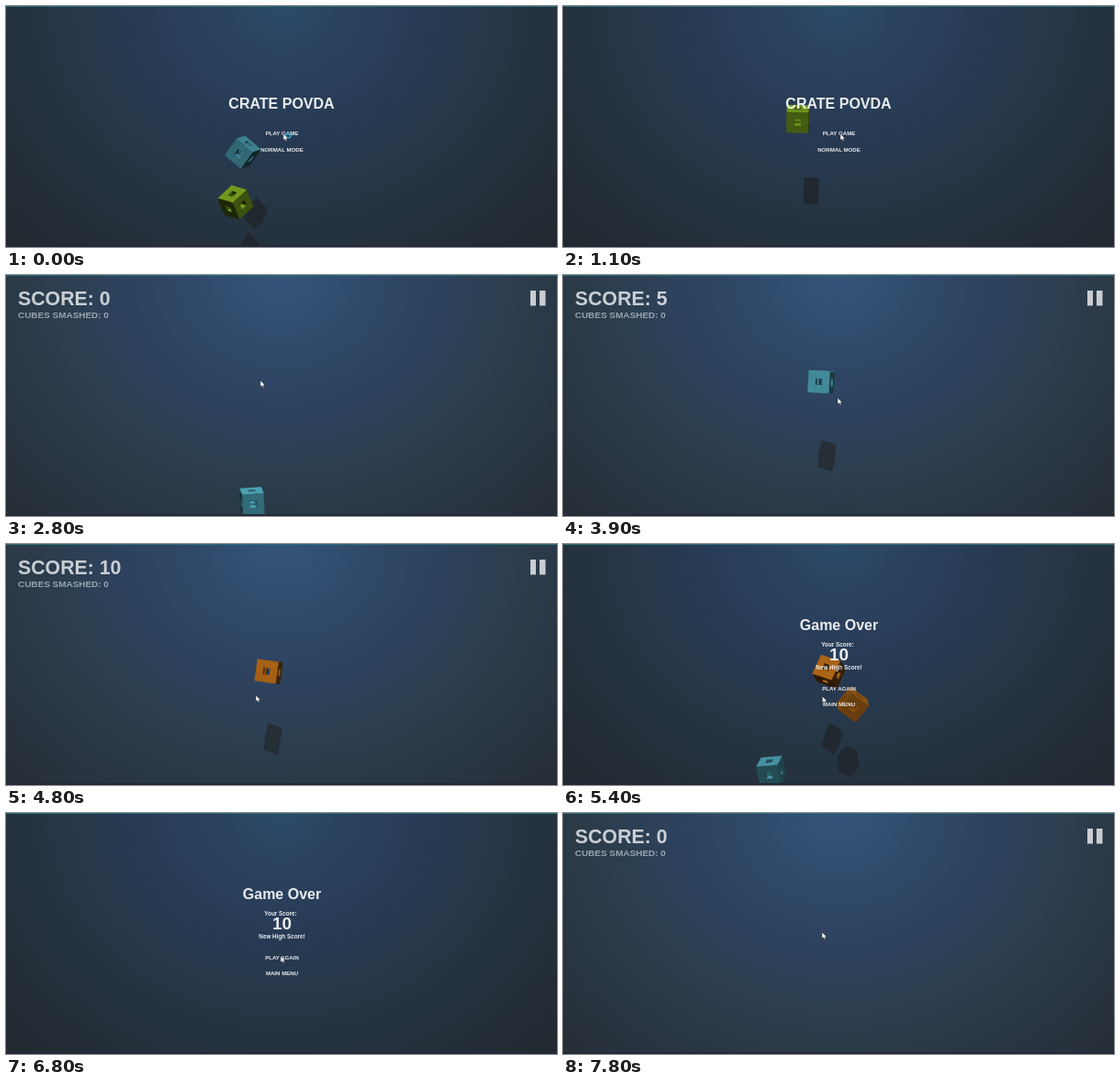
Write an HTML page with a canvas that moves like this. It is 600 by 263 pixels and loops after 8 s.

```html
<!DOCTYPE html>
<html lang="en">
<head>
<meta charset="utf-8">
<title>Cube game</title>
<style>
  html, body { margin: 0; width: 100%; height: 100%; overflow: hidden; }
  body {
    background: radial-gradient(ellipse at top, #335579 0%, #30496a 22%, #2d425e 40%,
      #2c3f51 56%, #2a3a48 68%, #28323d 89%, #262e36 100%);
  }
  canvas, svg { position: absolute; left: 0; top: 0; width: 600px; height: 263px; }
  text { font-family: "Liberation Sans", Arial, sans-serif; font-weight: bold; fill: #fff; }
  .menu { text-anchor: middle; font-size: 6.1px; fill-opacity: .9; }
  .menu .title { font-size: 16px; }
  .menu .note { font-size: 6.35px; }
  .menu .total { font-size: 19px; }
</style>
</head>
<body>
<canvas id="view" width="600" height="263"></canvas>
<svg viewBox="0 0 600 263">
  <rect id="dim" width="600" height="263" fill="#000"/>
  <rect width="600" height="1" fill="#2a6c76"/>
  <rect y="261" width="600" height="2" fill="#23293a"/>
  <g id="hud">
    <text id="score" x="13" y="33.3" font-size="21.3" fill-opacity=".75"></text>
    <text x="13" y="47" font-size="9.95" fill-opacity=".53">CUBES SMASHED: 0</text>
    <path d="M571 17h6v16.500h-6zM581 17h6.500v16.500h-6.500z" fill="#fff" fill-opacity=".75"/>
  </g>
  <g id="start" class="menu">
    <text class="title" x="300" y="111.700">CRATE POVDA</text>
    <text x="300.500" y="141.200">PLAY GAME</text>
    <text x="300.500" y="158.800">NORMAL MODE</text>
  </g>
  <g id="over" class="menu">
    <text class="title" x="300.500" y="93.500">Game Over</text>
    <text class="note" x="299" y="111.700">Your Score:</text>
    <text class="total" x="300.500" y="126.800">10</text>
    <text class="note" x="300.500" y="137.300">New High Score!</text>
    <text x="300.500" y="159.700">PLAY AGAIN</text>
    <text x="300.500" y="177.200">MAIN MENU</text>
  </g>
  <g id="cursor">
    <circle id="busy" cx="5.500" cy="2" r="2.400" fill="none" stroke="#3fa9c4" stroke-width="1.500"/>
    <path d="M0 0V7L1.700 5.600 2.900 8 4.100 7.400 3 5.200H5.200Z" fill="#fff" stroke="#1c2530" stroke-width=".5"/>
  </g>
</svg>
<script>
const $ = id => document.getElementById(id);
const ctx = $('view').getContext('2d');
const SIDE = 23.5, GRAVITY = 169;
const BLUE = [103, 215, 240], GREEN = [166, 224, 44], ORANGE = [254, 149, 34];

// Life span, apex (time, y), then x, speed, pose and spin at time t0 (seconds)
const cubes = [
  { color: BLUE, from: 0, to: 1.4, apex: [.1, 158], t0: 0, x: 258, vx: 80, pose: [.25, -.35, -.95], spin: [.8, .6, -.5] },
  { color: GREEN, from: 0, to: 1.4, apex: [.795, 107.5], t0: 0, x: 250, vx: 5, pose: [-.865, -.775, .286], spin: [.47, .7, -.24] },
  { color: BLUE, from: 2.4, to: 4.9, apex: [3.7, 110], t0: 2.8, x: 268, vx: 12, pose: [-.3, .1, -.07], spin: [.27, -.3, .11] },
  { color: ORANGE, from: 4.1, to: 6.1, apex: [5.1, 124], t0: 4.8, x: 286, vx: 6, pose: [0, -.2, .14], spin: [.5, -.3, .3] },
  { color: BLUE, from: 5.1, to: 6.9, apex: [6, 187], t0: 6.1, x: 221, vx: -8, pose: [0, 0, -.43], spin: [.6, .4, -.5] },
  { color: ORANGE, from: 5, to: 6.9, apex: [5.83, 144], t0: 6.1, x: 368, vx: 75, pose: [-.7, 0, -.54], spin: [-.6, .3, .5] }
];

// Time, x, y
const path = [
  [0, 302, 139.5], [1.8, 302, 139.5], [2.2, 277, 115], [2.9, 277, 115], [3.2, 287, 118], [3.5, 326, 131],
  [3.9, 299, 134], [4.4, 300, 140], [4.8, 272, 165], [5.2, 280, 166], [6.1, 299, 168],
  [6.6, 299, 156], [6.9, 299, 156], [7.6, 283, 131], [7.7, 283, 131], [7.8, 282, 130], [8, 282, 130]
];

// A sponge of 20 cells: face centres and core left out
const cells = [];
for (let x = -1; x < 2; x++) for (let y = -1; y < 2; y++) for (let z = -1; z < 2; z++)
  if (solid([x, y, z])) cells.push([x, y, z]);

function solid(c) {
  return c.every(v => Math.abs(v) < 2) && c.filter(v => v === 0).length < 2;
}

const normals = [0, 1, 2].flatMap(axis => [-1, 1].map(s => [0, 1, 2].map(i => i === axis ? s : 0)));

function rotator([a, b, c]) {
  const [sa, ca, sb, cb, sc, cc] = [a, b, c].flatMap(v => [Math.sin(v), Math.cos(v)]);
  return ([x, y, z]) => {
    [y, z] = [y * ca - z * sa, y * sa + z * ca];
    [x, z] = [x * cb + z * sb, z * cb - x * sb];
    return [x * cc - y * sc, x * sc + y * cc, z];
  };
}

// Corners of the face with normal n on a cube at c with half-size h
function corners(c, n, h) {
  const axis = n.findIndex(v => v);
  return [[-1, -1], [1, -1], [1, 1], [-1, 1]].map(([u, v]) => {
    const p = [...c];
    p[axis] += n[axis] * h;
    p[(axis + 1) % 3] += u * h;
    p[(axis + 2) % 3] += v * h;
    return p;
  });
}

function polygon(points, color) {
  ctx.beginPath();
  points.forEach(([x, y]) => ctx.lineTo(x, y));
  ctx.closePath();
  ctx.fillStyle = ctx.strokeStyle = color;
  ctx.fill();
  ctx.stroke();
}

function shade(color, [, y, z]) {
  const light = (y - z) / 2;
  const k = light > 0 ? .2 : (light ** 32 - light) * .9 + .2;
  return `rgb(${color.map(v => Math.round(v * k))})`;
}

function locate(cube, t) {
  const d = t - cube.t0;
  return {
    color: cube.color,
    x: cube.x + cube.vx * d,
    y: cube.apex[1] + GRAVITY * (t - cube.apex[0]) ** 2,
    turn: rotator(cube.pose.map((v, i) => v + cube.spin[i] * d))
  };
}

function drawShadow({ x, y, turn }) {
  const sx = 300 + (x - 300) * .67, sy = y * .68 + 118;
  for (const n of normals)
    polygon(corners([0, 0, 0], n, SIDE / 2).map(turn)
      .map(p => [sx + p[0] * .63, sy + p[1] * .65 + p[2] * .6]), '#262e36');
}

function drawCube({ color, x, y, turn }) {
  const size = SIDE / 3;
  const faces = normals.map(n => ({ n, dir: turn(n) })).filter(f => f.dir[2] > 0);
  const sorted = cells.map(c => ({ c, z: turn(c)[2] })).sort((a, b) => a.z - b.z);
  for (const { c } of sorted)
    for (const { n, dir } of faces)
      if (!solid(c.map((v, i) => v + n[i])))
        polygon(corners(c, n, .5).map(turn).map(p => [x + p[0] * size, y + p[1] * size]), shade(color, dir));
}

const ramp = (t, a, b) => Math.min(1, Math.max(0, (t - a) / (b - a)));

function cursorAt(t) {
  const i = path.findIndex(p => p[0] > t);
  const [a, b] = [path[i - 1], path[i]];
  const k = ramp(t, a[0], b[0]), e = k * k * (3 - 2 * k);
  return [a[1] + (b[1] - a[1]) * e, a[2] + (b[2] - a[2]) * e];
}

function draw(now) {
  const t = Math.floor(now % 8000 / 100) / 10;

  ctx.clearRect(0, 0, 600, 263);
  ctx.lineWidth = .4;
  const live = cubes.filter(c => t >= c.from && t < c.to).map(c => locate(c, t));
  live.forEach(drawShadow);
  live.forEach(drawCube);

  const start = 1 - ramp(t, 1.4, 1.7);
  const over = ramp(t, 4.8, 5.1) * (1 - ramp(t, 6.9, 7.2));
  $('start').style.opacity = start;
  $('over').style.opacity = over;
  $('dim').style.opacity = .13 * Math.max(start, over);

  const playing = t >= 1.4 && t < 4.9 || t >= 6.9;
  $('hud').style.display = playing ? '' : 'none';
  $('score').textContent = 'SCORE: ' + (t >= 3.4 && t < 4.6 ? 5 : t >= 4.6 && t < 6.9 ? 10 : 0);

  $('cursor').setAttribute('transform', `translate(${cursorAt(t)})`);
  $('busy').style.display = t < .2 ? '' : 'none';
  requestAnimationFrame(draw);
}
requestAnimationFrame(draw);
</script>
</body>
</html>
```
